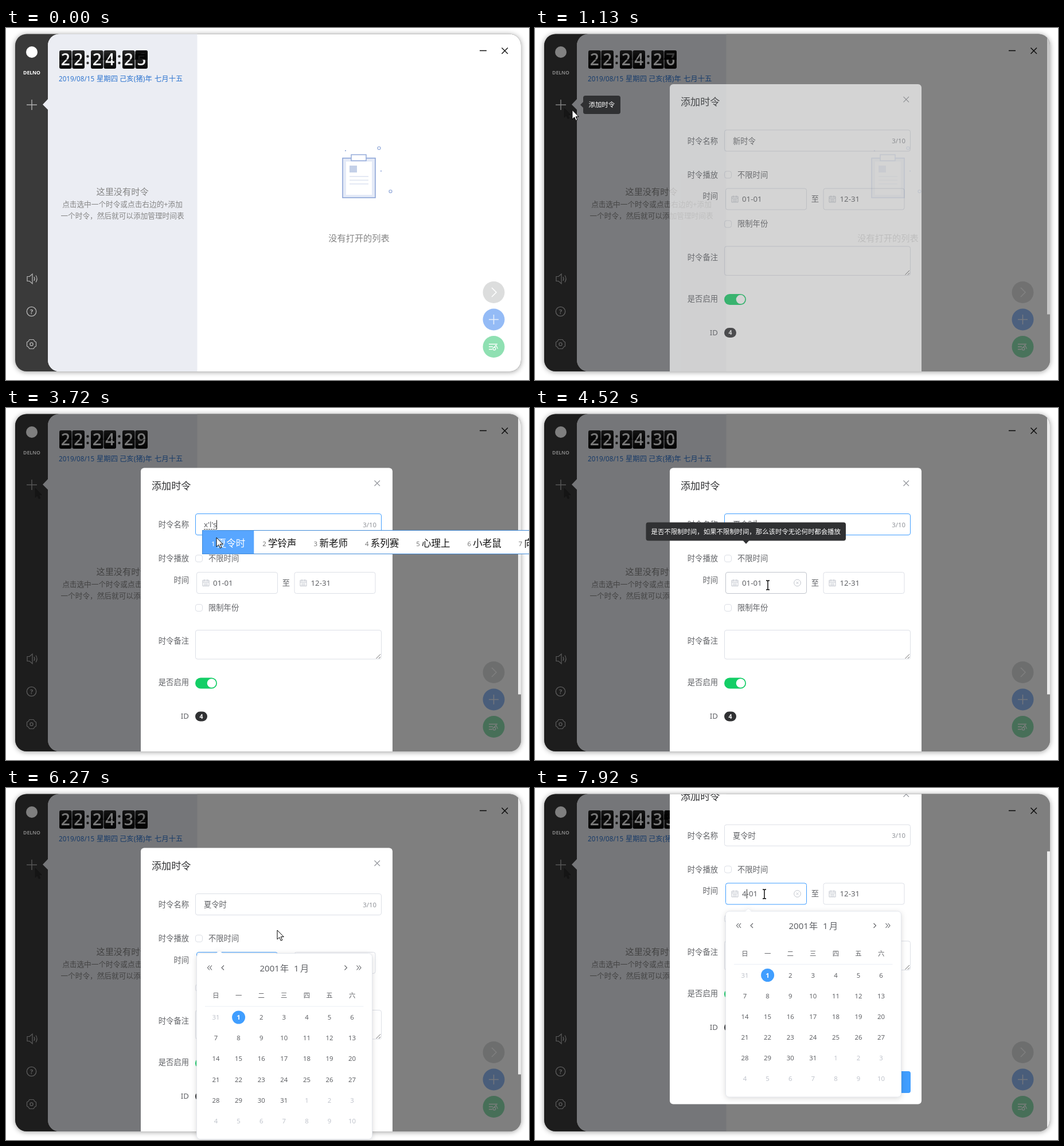
Write an HTML page that moves like this. It is 912 px wide and 614 px high and loops after 7990 ms.

```html
<!DOCTYPE html>
<html lang="zh-CN">
<head>
<meta charset="utf-8">
<title>添加时令</title>
<style>
html, body { margin: 0; width: 912px; height: 614px; overflow: hidden; background: #fff; }
svg { display: block; font-family: "Noto Sans", "Noto Sans CJK SC", "Noto Sans CJK", sans-serif; }
text { white-space: pre; }
.digit { font: 600 28px "Open Sans", sans-serif; text-anchor: middle; fill: #f4f4f4; }
.window { filter: drop-shadow(0 1px 5px rgba(0, 0, 0, .4)); }
.popper { filter: drop-shadow(0 2px 5px rgba(0, 0, 0, .14)); }
</style>
</head>
<body>
<svg width="912" height="614" viewBox="0 0 912 614">
  <defs>
    <linearGradient id="card" x2="0" y2="1">
      <stop stop-color="#2b2b2b"/><stop offset=".5" stop-color="#080808"/>
      <stop offset=".5" stop-color="#222"/><stop offset="1" stop-color="#050505"/>
    </linearGradient>
    <clipPath id="top"><rect x="90" y="38" width="160" height="17"/></clipPath>
    <clipPath id="bottom"><rect x="90" y="55" width="160" height="17"/></clipPath>
    <clipPath id="frame"><rect x="16" y="10.5" width="882" height="588.5" rx="20"/></clipPath>
  </defs>
  <g id="page"></g>
  <g id="live"></g>
</svg>
<script>
const LOOP = 7990, SCROLL = 120.5;
const BLUE = '#409eff', DARK = '#303133', GREY = '#606266', PALE = '#c0c4cc', LINE = '#dcdfe6';

const rect = (x, y, w, h, fill, extra = '') =>
  `<rect x="${x}" y="${y}" width="${w}" height="${h}" fill="${fill}" ${extra}/>`;
const circle = (x, y, r, fill, extra = '') => `<circle cx="${x}" cy="${y}" r="${r}" fill="${fill}" ${extra}/>`;
const path = (d, stroke, width = 1, fill = 'none') =>
  `<path d="${d}" stroke="${stroke}" stroke-width="${width}" fill="${fill}"/>`;
const group = (attrs, ...parts) => `<g ${attrs}>${parts.join('')}</g>`;
// Text centred vertically on cy
const text = (x, cy, size, str, fill = GREY, extra = '') =>
  `<text x="${x}" y="${cy + size * .37}" font-size="${size}" fill="${fill}" ${extra}>${str}</text>`;
const middle = 'text-anchor="middle"', end = 'text-anchor="end"', medium = 'font-weight="500"';
const box = (x, y, w, h, stroke) => rect(x + .5, y + .5, w - 1, h - 1, '#fff', `rx="3.5" stroke="${stroke}"`);

const ramp = (t, a, b) => Math.min(1, Math.max(0, (t - a) / (b - a)));
const smooth = p => p * p * (3 - 2 * p);
const within = (t, a, b) => t >= a && t < b;

function page() {
  const icon = '#b9b9b9', ink = '#8ea6d8';
  return group('',
    rect(16, 10.5, 882, 588.5, '#3a3a3a', 'rx="20" class="window"'),
    path('M93 10.5H878a20 20 0 0 1 20 20V579a20 20 0 0 1-20 20H93a20 20 0 0 1-20-20V30.5a20 20 0 0 1 20-20Z', 'none', 0, '#fff'),
    path('M333.5 10.5H93a20 20 0 0 0-20 20V124L64 133.500l9 9V579a20 20 0 0 0 20 20H333.500Z', 'none', 0, '#ebedf3'),
    // Sidebar
    circle(45, 42, 10, '#fff'),
    text(45, 77.5, 8.6, 'DELNO', '#fff', `${middle} font-weight="700"`),
    path('M37 433.500h4l5-4.500v17l-5-4.500h-4ZM49 434q2 3.500 0 7M52 431.500q4 6 0 12', icon, 1.2),
    circle(44.5, 494.500, 8.2, 'none', `stroke="${icon}" stroke-width="1.3"`),
    text(44.5, 494.500, 11, '?', icon, `${middle} font-weight="600"`),
    path('M41 543.500h7l2 3 2.500 1.500v7l-2.500 1.500-2 3h-7l-2-3-2.500-1.500v-7l2.500-1.500Z', icon, 1.2),
    circle(44.5, 551.5, 2.6, 'none', `stroke="${icon}" stroke-width="1.2"`),
    // Left panel
    text(92, 88.5, 11.7, '2019/08/15', '#2e75d0'),
    text(158, 88.5, 12.35, '星期四', '#2e75d0'),
    text(198, 88.5, 12.35, '己亥(猪)年', '#2e75d0'),
    text(259, 88.5, 12.35, '七月十五', '#2e75d0'),
    text(203, 285.5, 15.2, '这里没有时令', '#858585', middle),
    text(203, 307, 12.67, '点击选中一个时令或点击右边的+添加', '#858585', middle),
    text(203, 327, 12.67, '一个时令，然后就可以添加管理时间表', '#858585', middle),
    // Empty list
    rect(587, 227, 57, 69, '#e4eaf7', `stroke="${ink}" stroke-width="1.6"`),
    rect(593, 233, 45, 58, '#fff'),
    rect(602, 221, 26, 10.5, '#fff', `stroke="${ink}" stroke-width="1.4"`),
    rect(599, 240, 13, 12, '#c4d0e8'),
    path('M599 259h33M599 265.500h33M599 272h33', '#e4e9f4', 1.8),
    circle(650.5, 209.5, 2.5, 'none', `stroke="${ink}" stroke-width="1.2"`),
    circle(670.5, 285, 2.5, 'none', `stroke="${ink}" stroke-width="1.2"`),
    circle(592, 214, 1.1, ink), circle(654, 249.500, 1.1, ink),
    text(615.5, 366, 15.2, '没有打开的列表', '#858585', middle),
    // Window and round buttons
    path('M826 39.500H838M864.500 34.500l10.500 10.500M875 34.500l-10.500 10.500', '#111', 1.4),
    circle(850.5, 461, 19, '#dcdddd'), path('M847 453l8 8-8 8', '#fff', 1.5),
    circle(850.5, 508.5, 19, '#94bbf6'), path('M842 508.500h17M850.500 500v17', '#e6effc', 1.5),
    circle(850.5, 556, 19, '#8fe0b2'),
    path('M842 551.500h15M842 556h7M842 560.500h6M857.500 559.500l-3-6-3.500 4', '#fff', 1.3),
    circle(851.5, 559.5, 2.4, 'none', 'stroke="#fff" stroke-width="1.2"'));
}

// Flip clock
const ticks = [-80, 950, 1890, 2950, 3900, 4900, 5890, 6750, 7840];
const face = (x, digit, half, shade = 0) => group(`clip-path="url(#${half})"`,
  rect(x, 39, 21.5, 32, 'url(#card)', 'rx="3"'),
  `<text class="digit" x="${x + 10.75}" y="65">${digit}</text>`,
  rect(x, 39, 21.5, 32, '#000', `rx="3" opacity="${shade}"`));

function card(x, from, to, p) {
  const moving = from !== to && p < 1, folding = p < .5;
  const flap = moving && group(`transform="translate(0 55) scale(1 ${Math.abs(1 - 2 * p)}) translate(0 -55)"`,
    folding ? face(x, from, 'top', Math.min(.95, 5 * p)) : face(x, to, 'bottom', 1 - p));
  return face(x, to, 'top', moving ? .9 * (1 - p) : 0) + face(x, moving ? from : to, 'bottom') +
    (flap || '') + rect(x, 54.5, 21.5, 1, '#000', 'opacity=".75"');
}

function clock(t) {
  const k = ticks.filter(at => at <= t).length - 1;
  const p = ramp(t, ticks[k], ticks[k] + 450);
  const from = '2224' + (25 + k), to = '2224' + (26 + k);
  return [93, 115.5, 148, 170.5, 203, 225.5].map((x, i) => card(x, from[i], to[i], p)).join('') +
    [142.5, 197.5].map(x => circle(x, 49.5, 2.2, '#333') + circle(x, 61, 2.2, '#333')).join('');
}

// Pointer: time, x, y
const moves = [
  [70, 716, 541], [680, 51, 140], [1050, 51, 140], [1690, 368, 211], [2000, 368, 211], [2200, 390, 206],
  [2270, 390, 206], [2470, 303, 203], [2950, 303, 203], [3260, 367, 226], [3850, 367, 226], [4150, 368, 262],
  [4250, 368, 262], [4480, 406, 309], [4560, 406, 309], [4790, 378, 313], [5850, 378, 313], [6200, 473, 248],
  [6650, 473, 248], [7000, 360, 185], [7100, 360, 185], [7250, 378, 185], [7310, 400, 185], [LOOP, 400, 185]
];
function pointer(t) {
  const i = Math.max(1, moves.findIndex(m => m[0] > t));
  const [t0, x0, y0] = moves[i - 1], [t1, x1, y1] = moves[i];
  const p = smooth(ramp(t, t0, t1));
  return { x: x0 + (x1 - x0) * p, y: y0 + (y1 - y0) * p };
}
const ARROW = 'M0 0V16L3.800 12.500 6.300 18.300 8.800 17.200 6.300 11.600H11.300Z';
const BEAM = 'M-3-8h2l1 1 1-1h2M0-7V7M-3 8h2l1-1 1 1h2';
function cursor(t, { x, y }) {
  if (t < 70) return '';
  const beam = within(t, 1650, 2620) || within(t, 4380, 5900) || t >= 6950;
  return group(`transform="translate(${x} ${y})"`, beam ? path(BEAM, '#000', 1.4) : path(ARROW, '#000', 1, '#fff'));
}

const blink = t => (t - 3400 + 10600) % 1060 < 530;
const caret = (x, cy) => rect(x, cy - 8, 1, 16, '#222');

function nameField(t, mouse) {
  const focus = within(t, 2270, 5570), composing = within(t, 2950, 3900), selecting = within(t, 2270, 2950);
  const border = focus ? BLUE : within(t, 1650, 2270) ? PALE : LINE;
  const typed = t < 3430 ? 'x' : t < 3510 ? "x'l" : "x'l's";
  const value = t < 2950 ? '新时令' : composing ? typed : '夏令时';
  const width = composing ? { 1: 7, 3: 14, 5: 22 }[typed.length] : 40;
  const left = Math.max(345, Math.min(385, mouse.x));
  return box(330, 184, 325, 38, border) +
    (selecting ? rect(left, 195, 385 - left, 17, '#3390ff') : '') +
    text(345, 203.5, 13.3, value, selecting && left < 350 ? '#fff' : GREY) +
    (composing ? `<path d="M345 211.500h${width}" stroke="#444" stroke-dasharray="3 1"/>` : '') +
    (focus && !selecting && blink(t) ? caret(345 + width, 203.5) : '') +
    text(646, 203.500, 11.4, '3/10', '#909399', end);
}

const calendarIcon = x => path(`M${x} 300.500h11v10h-11ZM${x} 303.500h11M${x + 3} 299v3M${x + 8} 299v3M${x + 2} 306h7M${x + 2} 308.500h7`, PALE);

function startField(t) {
  const hover = within(t, 4380, 5900) || t >= 7000, edited = t >= 7700;
  const selected = ramp(t, 7100, 7250) * 16;
  return box(332, 286, 142, 38, t >= 5570 ? BLUE : hover ? PALE : LINE) + calendarIcon(343) +
    (!edited && selected ? rect(361, 296, selected, 17, '#3390ff') : '') +
    text(361, 305, 13.3, edited ? '4-01' : '01-01') +
    (edited && blink(t) ? caret(369, 305) : '') +
    (hover ? circle(457.5, 305, 5.8, 'none', `stroke="${PALE}"`) + path('M455.500 303l4 4M459.500 303l-4 4', PALE) : '');
}

function dialog(t, scroll, mouse) {
  const p = ramp(t, 935, 1235);
  if (!p) return '';
  const labels = [['时令名称', 203.5], ['时令播放', 262.5], ['时间', 300], ['时令备注', 406.5], ['是否启用', 478.5], ['ID', 537.5]];
  return group('clip-path="url(#frame)"', group(`opacity="${p}" transform="translate(0 ${-19 * (1 - p) - scroll})"`,
    rect(235, 104.5, 439, 567.5, '#fff', 'rx="6"'),
    text(254, 135.5, 17.1, '添加时令', DARK),
    path('M642.500 126.500l9.500 9.500M652 126.500l-9.500 9.500', '#909399', 1.1),
    ...labels.map(([label, y]) => text(319, y, 13.3, label, GREY, end)),
    nameField(t, mouse),
    box(330, 256, 13, 13, LINE), text(353, 262.5, 13.3, '不限时间'),
    startField(t),
    text(488.5, 305, 13.3, '至', GREY, middle),
    box(502.5, 286, 142, 38, LINE), calendarIcon(513), text(531.5, 305, 13.3, '12-31'),
    box(330, 342, 13, 13, LINE), text(353, 348, 13.3, '限制年份'),
    box(330, 387, 325, 51.5, LINE), path('M645.500 437l7.500-7.500M650 437l3-3', '#666'),
    rect(330, 470.5, 38, 19, '#13ce66', 'rx="9.500"'), circle(358.5, 480, 7.8, '#fff'),
    rect(330, 529.5, 21, 17, DARK, 'rx="8.500"'), text(340.5, 538, 10.5, '4', '#fff', `${middle} font-weight="600"`),
    rect(591, 614.5, 64, 38, BLUE, 'rx="4"')),
    rect(893, 10.5 + scroll * .83, 5, 489, '#ececec', `opacity="${p}"`));
}

function calendar(t, scroll) {
  const p = smooth(ramp(t, 5570, 5780));
  if (!p) return '';
  const y = Math.min(288.5, 335.5 - scroll);
  const column = i => 366 + 39.6 * (i % 7);
  const days = Array.from({ length: 42 }, (_, i) => {
    const cy = 111.5 + 36.1 * Math.floor(i / 7), out = i < 1 || i > 31;
    const label = i < 1 ? 31 : out ? i - 31 : i;
    return (i === 1 ? circle(column(i), cy, 11.5, BLUE) : '') +
      text(column(i), cy, 11.4, label, i === 1 ? '#fff' : out ? PALE : GREY, middle + (i === 1 ? ' font-weight="700"' : ''));
  });
  return group(`opacity="${p}" transform="translate(0 ${y}) scale(1 ${p})"`,
    group('class="popper"',
      rect(332.5, 0, 306, 324, '#fff', 'rx="6" stroke="#e4e7ed"'),
      path('M366 .600L372-5l6 5.600', '#ebeef5', 1, '#fff')),
    path('M355 21l-3.500 4 3.500 4M359 21l-3.500 4 3.500 4M380 21l-4 4 4 4M590.500 21l4 4-4 4M611.500 21l3.500 4-3.500 4M615.500 21l3.500 4-3.500 4', GREY, 1.1),
    text(442.5, 25.500, 15, '2001', GREY, medium), text(478, 25.500, 15.2, '年', GREY, medium),
    text(502, 25.500, 15, '1', GREY, medium), text(513, 25.500, 15.2, '月', GREY, medium),
    ...[...'日一二三四五六'].map((day, i) => text(column(i), 73.5, 11.4, day, GREY, middle)),
    path('M347 92.500H623.500', '#ebeef5'),
    ...days);
}

function tooltips(t) {
  const add = ramp(t, 740, 820) * (1 - ramp(t, 1150, 1300));
  const limit = ramp(t, 4200, 4300) * (1 - ramp(t, 4570, 4760));
  return group(`opacity="${add}"`,
      rect(84, 118, 65, 32, DARK, 'rx="4"'), path('M84.500 128.500L79 134l5.500 5.500Z', 'none', 0, DARK),
      text(93.5, 134, 11.4, '添加时令', '#fff', medium)) +
    group(`opacity="${limit}"`,
      rect(193.5, 199.5, 348.5, 32, DARK, 'rx="4"'), path('M362.500 231L368 237l5.500-6Z', 'none', 0, DARK),
      text(202.500, 215.5, 11.4, '是否不限制时间，如果不限制时间，那么该时令无论何时都会播放', '#fff', medium));
}

const shortList = [...'想下小学向新些线'];
const pairList = ['下来', '夏令', '系列', '心里', '训练', '效率', '小鹿', '洗脸'];
const longList = ['夏令时', '学铃声', '新老师', '系列赛', '心理上', '小老鼠', '向来是'];
function candidates(t) {
  if (!within(t, 2950, 3900)) return '';
  const words = t < 3430 ? shortList : t < 3510 ? pairList : longList;
  const pitch = 39.8 + 16.5 * words[0].length;
  return rect(342.5, 213.5, words.length * pitch, 41, '#fff', 'stroke="#3f8ad8"') +
    rect(343, 214, pitch, 40, '#58a6ff') +
    words.map((word, i) => {
      const x = 358 + i * pitch;
      return text(x, 237, 11.5, i + 1, i ? '#777' : '#fff') + text(x + 9.8, 235.5, 16.5, word, i ? '#111' : '#fff');
    }).join('');
}

function scene(t) {
  const mouse = pointer(t), scroll = SCROLL * smooth(ramp(t, 6360, 6590));
  return [
    path('M36 134h18M45 125v18', within(t, 660, 1150) ? '#fff' : '#b0b0b0', 1.4),
    clock(t),
    t > 1050 ? group('transform="translate(51 140)" opacity=".35"', path(ARROW, '#000', 1, '#111')) : '',
    rect(16, 10.5, 882, 588.5, '#000', `rx="20" opacity="${.5 * ramp(t, 935, 1135)}"`),
    dialog(t, scroll, mouse),
    calendar(t, scroll),
    tooltips(t),
    candidates(t),
    cursor(t, mouse)
  ].join('');
}

const live = document.getElementById('live');
document.getElementById('page').innerHTML = page();
function draw() {
  live.innerHTML = scene(performance.now() % LOOP);
  requestAnimationFrame(draw);
}
draw();
</script>
</body>
</html>
```
